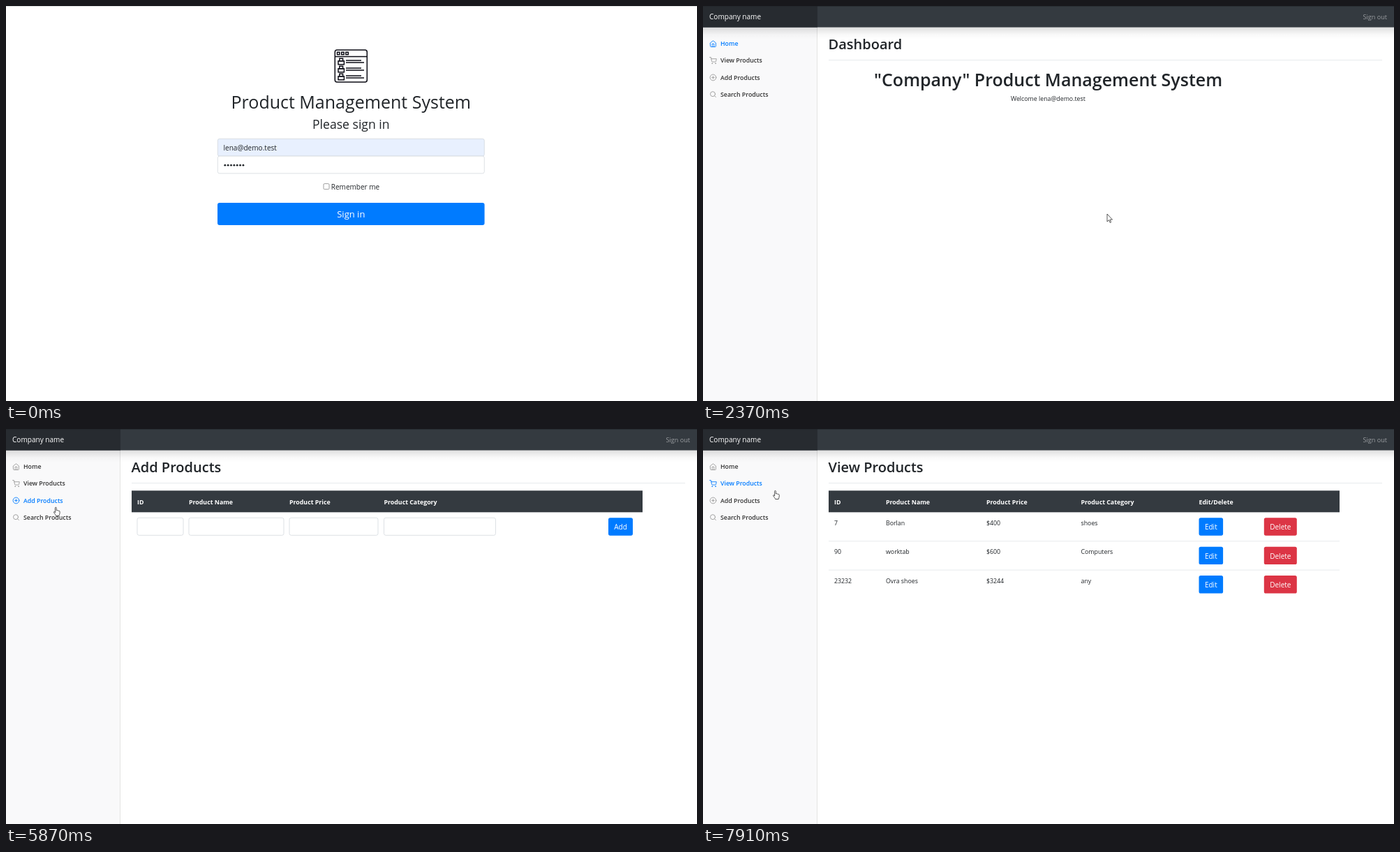
Recreate the animation shown at these times as an HTML page. Size 990 by 566 pixels, loop 8000 ms.

```html
<!DOCTYPE html>
<html lang="en">
<head>
<meta charset="utf-8">
<title>Product Management System</title>
<style>
  html, body { margin: 0; width: 100%; height: 100%; overflow: hidden; background: #fff; }
  svg { display: block; font-family: "Open Sans", "Noto Sans", sans-serif; }
  text { white-space: pre; }
  .link { fill: #333; --icon: #999; }
  .link.hover { --icon: #333; }
  .link.active { fill: #007bff; --icon: #007bff; }
  .icon { fill: none; stroke: var(--icon); stroke-width: 2; stroke-linecap: round; stroke-linejoin: round; }
</style>
</head>
<body>
<svg id="stage" width="990" height="566" viewBox="0 0 990 566"></svg>
<script>
const LOOP = 8000;
const USER = 'lena@demo.test';
const DARK = '#343a40', BLUE = '#007bff', RED = '#dc3545', LINE = '#dee2e6', INK = '#212529';
const stage = document.getElementById('stage');

// Markup helpers
const text = (x, y, size, str, attrs = '') =>
  `<text x="${x}" y="${y}" font-size="${size}" ${attrs}>${str}</text>`;
const rect = (x, y, w, h, fill, attrs = '') =>
  `<rect x="${x}" y="${y}" width="${w}" height="${h}" fill="${fill}" ${attrs}/>`;
const hline = (x1, x2, y, color = LINE, width = 0.7) =>
  `<path d="M${x1} ${y}H${x2}" stroke="${color}" stroke-width="${width}"/>`;
const circle = (x, y, r) => `<circle cx="${x}" cy="${y}" r="${r}"/>`;
const group = (id, content, attrs = '') => `<g id="${id}" ${attrs}>${content}</g>`;
const semi = 'font-weight="600"', bold = 'font-weight="700"', mid = 'text-anchor="middle"';

const button = (x, y, w, label, color) =>
  rect(x, y, w, 25.4, color, 'rx="2.6"') +
  text(x + w / 2, y + 16.9, 10.05, label, `fill="#fff" ${mid}`);
const field = (x, y, w, h, fill) =>
  rect(x, y, w, h, fill, 'rx="2.6" stroke="#ced4da" stroke-width=".7"');
const title = str => text(179.5, 62, 20, str, semi) + hline(180, 973, 77.5);
const tableHead = (y, columns, labels) =>
  rect(180, y, 732, 31, DARK) +
  labels.map((s, i) => text(columns[i], y + 19.2, 8.8, s, `fill="#fff" ${bold}`)).join('');

// Sign-in page
function appIcon() {
  let out = '<rect x="471.3" y="63" width="46" height="46" rx="3"/><path d="M471 72.6H517.5"/>';
  for (let i = 0; i < 3; i++) {
    const y = 76 + 11 * i;
    out += `<rect x="${474.5 + 6.2 * i}" y="66.2" width="3.4" height="3.4"/>
      <rect x="476" y="${y + 2.8}" width="8.4" height="5"/>
      <rect x="477.8" y="${y - 0.8}" width="4.8" height="3.6"/>
      <path d="M487 ${y + 2}H509M487 ${y + 5}H513"/>`;
  }
  return `<g fill="none" stroke="#0b0b14" stroke-width="1.5">${out}</g>`;
}

const dots = Array.from({ length: 7 }, (_, i) => circle(313.8 + 4.35 * i, 228.2, 1.4)).join('');

const login = hline(0, 990, 0.3, '#d5d7d9', 1) + appIcon() +
  text(494.3, 147, 25, 'Product Management System', mid) +
  text(494.3, 175.7, 17.6, 'Please sign in', mid) +
  field(303.3, 190.3, 382, 24.8, '#e8f0fe') + text(311.5, 206.7, 10.05, USER) +
  field(303.3, 215.1, 382, 24.8, '#fff') + dots +
  rect(455, 254.6, 8, 8, '#fff', 'rx="1.4" stroke="#767676" stroke-width=".7"') +
  text(465.8, 262.7, 10, 'Remember me') +
  rect(303, 282, 382.6, 32, BLUE, 'id="signIn" rx="3"') +
  text(494.3, 303, 13, 'Sign in', `fill="#fff" ${mid}`);

// Shared frame of the inner pages
const navItems = [
  ['Home', '<path d="M3 9l9-7 9 7v11a2 2 0 0 1-2 2H5a2 2 0 0 1-2-2zM9 22V12h6v10"/>'],
  ['View Products', circle(9, 21, 1) + circle(20, 21, 1) +
    '<path d="M1 1h4l2.68 13.39a2 2 0 0 0 2 1.61h9.72a2 2 0 0 0 2-1.61L23 6H6"/>'],
  ['Add Products', circle(12, 12, 10) + '<path d="M12 8v8M8 12h8"/>'],
  ['Search Products', circle(11, 11, 8) + '<path d="M21 21l-4.35-4.35"/>']
];
const nav = navItems.map(([label, icon], i) => `<g class="link">
  <g class="icon" transform="translate(9.2 ${48.9 + 24.15 * i}) scale(.4375)">${icon}</g>
  ${text(25, 57.2 + 24.15 * i, 8.8, label, semi)}</g>`).join('');

const frame = rect(0, 0, 163.5, 566, '#f9f9fa') + rect(163, 0, 0.8, 566, '#dcdddd') + nav;
const topBar = rect(0, 30, 990, 18, 'url(#shadow)') + rect(0, 0, 990, 30.5, DARK) +
  rect(0, 0, 164, 30.5, '#272b30') + hline(0, 990, 0.3, '#22262a') +
  text(9, 19.3, 10.05, 'Company name', 'fill="#fff"') +
  text(980, 19, 9.1, 'Sign out', 'fill="#9a9da0" text-anchor="end"');

// Inner pages
const home = title('Dashboard') +
  text(494.6, 115, 25, '"Company" Product Management System', `${mid} ${semi}`) +
  text(494.4, 135.8, 8.8, 'Welcome ' + USER, mid);

const headings = ['ID', 'Product Name', 'Product Price', 'Product Category', 'Edit/Delete'];
const columns = [188, 262, 406, 541.5, 710.5];
const products = [
  ['7', 'Borlan', '$400', 'shoes'],
  ['90', 'worktab', '$600', 'Computers'],
  ['23232', 'Ovra shoes', '$3244', 'any']
];
const view = title('View Products') + tableHead(88.3, columns, headings) +
  products.map((row, i) => {
    const y = 119.3 + 41.4 * i;
    return (i ? hline(180, 912, y) : '') +
      row.map((s, c) => text(columns[c], y + 18.7, 8.8, s)).join('') +
      button(710.5, y + 8, 34.6, 'Edit', BLUE) + button(803.8, y + 8, 47, 'Delete', RED);
  }).join('');

const add = title('Add Products') + tableHead(88.3, columns, headings.slice(0, 4)) +
  [66, 136, 127, 160].map((w, i) => field(columns[i], 127.3, w, 25, '#fff')).join('') +
  button(863, 127.3, 35, 'Add', BLUE);

const search = title('Search Products') +
  text(188, 105.2, 10.05, 'Search product by ID', 'fill="#6c757d"') +
  tableHead(124, [188, 244, 415, 576.5, 777.5], headings);

stage.innerHTML = `<defs><linearGradient id="shadow" x1="0" y1="0" x2="0" y2="1">
    <stop offset="0" stop-opacity=".13"/><stop offset=".32" stop-opacity=".075"/>
    <stop offset=".62" stop-opacity=".023"/><stop offset="1" stop-opacity="0"/>
  </linearGradient></defs>` +
  group('login', login) +
  group('frame', frame) +
  Object.entries({ home, view, add, search }).map(([id, content]) => group(id, content)).join('') +
  group('topBar', topBar) +
  group('status', '<path id="statusBox" fill="#dee1e6" stroke="#cfd2d7" stroke-width=".6"/>' +
    text(1.8, 561.7, 7.45, '', 'id="statusText" fill="#54585d"')) +
  group('cursor',
    '<path id="arrow" d="M0 0V11l2.5-2.3 1.7 3.8 1.5-.7-1.7-3.7H7.5z"/>' +
    `<path id="hand" transform="translate(-3.3 0)" d="M2.4 8V1.3a.9.9 0 0 1 1.8 0V5c.3-.6 1.6-.5 1.7.2
      .4-.5 1.5-.3 1.6.4.5-.4 1.5-.1 1.5.7V9c0 1.5-1 2-1 3.5H3.5C3.5 11.5 1.5 9.5.5 7.7c-.5-1 .8-1.6 1.9 0z"/>`,
    'fill="#fff" stroke="#222" stroke-width=".75" stroke-linejoin="round"');
stage.setAttribute('fill', INK);

// Timeline
const pages = [[0, 'login'], [2220, 'home'], [4000, 'view'], [5500, 'add'], [6430, 'search'], [7670, 'view']];
const tabs = ['home', 'view', 'add', 'search'];

// time, x, y of the pointer's hot spot
const pointer = [
  [420, 933, 545], [800, 796, 459], [1040, 796, 459], [1440, 640, 349], [1670, 640, 349],
  [1910, 605, 309], [2220, 579, 298], [2385, 579, 298], [2460, 499, 252], [2520, 499, 252],
  [2760, 437, 227], [2940, 437, 227], [3220, 150, 20], [3460, 64, 70], [3760, 64, 70],
  [3850, 68.5, 79], [4570, 68.5, 79], [5030, 68.5, 98], [5340, 68.5, 100], [5720, 68.5, 100],
  [6090, 75.5, 129], [6890, 75.5, 129], [7520, 79, 72], [7600, 80, 79], [7909, 80, 79], [7910, 103.5, 88]
];

// file, bar width, fade-in start and end, fade-out start and end
const hints = [
  ['viewProducts', 226, 3380, 3460, 4240, 4400],
  ['addProduct', 221, 5220, 5340, 5500, 5570],
  ['searchProduct', 230, 6270, 6430, 6810, 6970]
];

const $ = id => document.getElementById(id);
const links = [...document.querySelectorAll('.link')];
const progress = (t, a, b) => Math.min(1, Math.max(0, (t - a) / (b - a)));
const show = (id, on) => $(id).setAttribute('visibility', on ? 'visible' : 'hidden');

function pointerAt(t) {
  const next = pointer.findIndex(k => k[0] > t);
  if (next < 0) return pointer.at(-1).slice(1);
  const [t0, x0, y0] = pointer[Math.max(0, next - 1)], [t1, x1, y1] = pointer[next];
  const p = progress(t, t0, t1);
  return [x0 + (x1 - x0) * p, y0 + (y1 - y0) * p];
}

function drawStatus(t) {
  const hint = hints.find(h => t >= h[2] && t < h[5]);
  show('status', hint);
  if (!hint) return;
  const [file, width, a, b, c, d] = hint;
  $('status').setAttribute('opacity', progress(t, a, b) * (1 - progress(t, c, d)));
  $('statusBox').setAttribute('d', `M-1 551.8H${width - 2}a2 2 0 0 1 2 2V567H-1z`);
  $('statusText').textContent = `localhost:8082/Product_Management_Ssytem/${file}.jsp`;
}

function draw(t) {
  const page = pages.findLast(p => p[0] <= t)[1];
  const inside = page !== 'login';
  ['login', ...tabs].forEach(id => show(id, id === page));
  show('frame', inside);
  show('topBar', inside);

  const [x, y] = pointerAt(t);
  const row = inside && x < 163 ? Math.floor((y - 42) / 24) : -1;
  links.forEach((link, i) => {
    link.setAttribute('class', 'link' + (tabs[i] === page ? ' active' : i === row ? ' hover' : ''));
  });

  const onButton = !inside && x > 303 && x < 686 && y > 282 && y < 314;
  const onLink = onButton || (row >= 0 && row < 4) || (inside && x < 163 && y < 30);
  const seen = t >= pointer[0][0];
  $('cursor').setAttribute('transform', `translate(${x} ${y})`);
  show('arrow', seen && !onLink);
  show('hand', seen && onLink);

  const tint = progress(t, 1840, 1990);
  $('signIn').setAttribute('fill', `rgb(0 ${123 - 18 * tint} ${255 - 38 * tint})`);
  drawStatus(t);
}

const start = performance.now();
function tick() {
  draw((performance.now() - start) % LOOP);
  requestAnimationFrame(tick);
}
tick();
</script>
</body>
</html>
```
